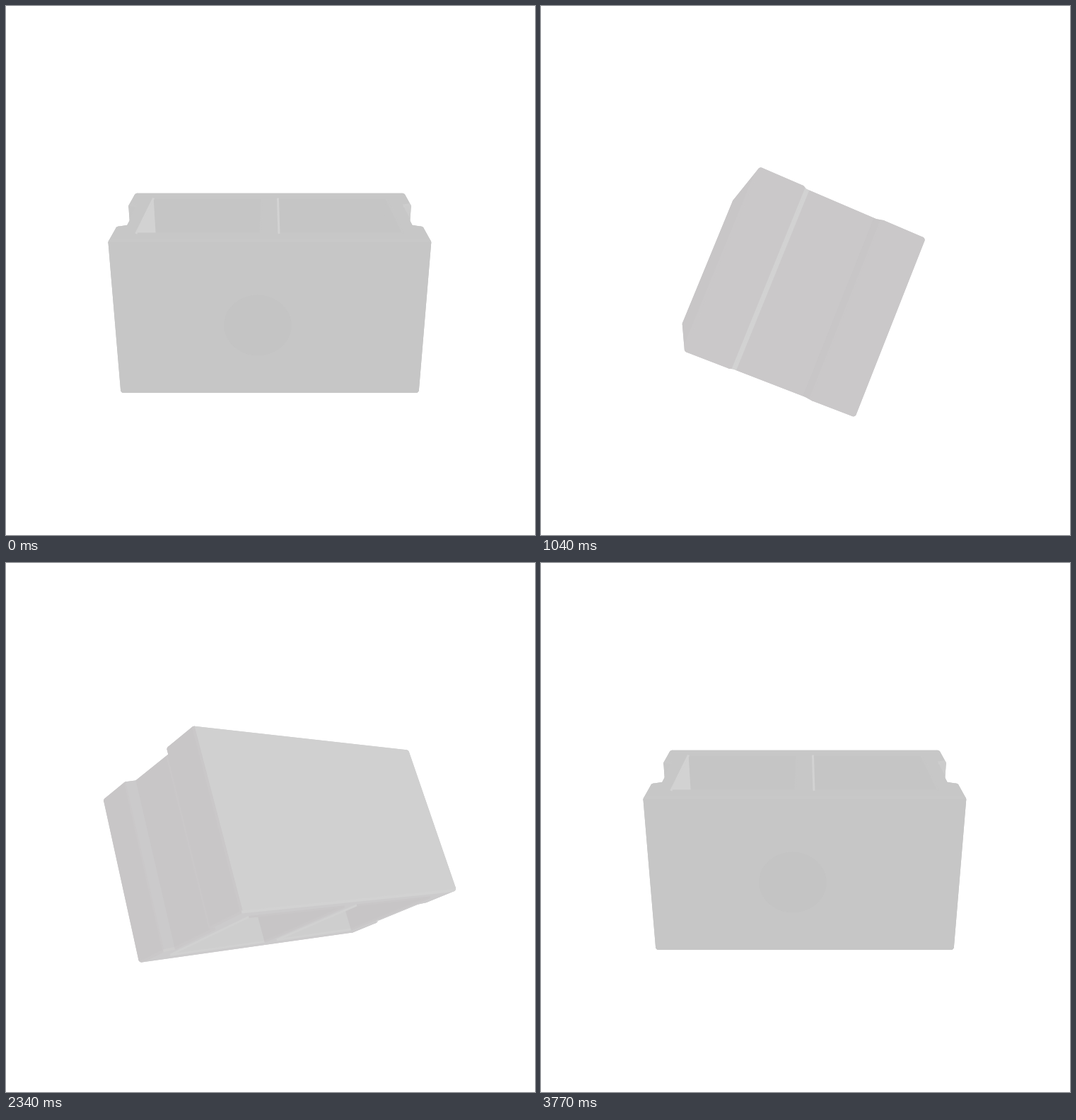
Recreate the animation shown at these times as an HTML page with a canvas. Size 748x748 px, loop 3900 ms.

```html
<!DOCTYPE html>
<html lang="en">
<head>
<meta charset="utf-8">
<title>Rotating block</title>
<style>
  html, body { margin: 0; width: 100%; height: 100%; overflow: hidden; background: #fff; }
  canvas { display: block; width: 748px; height: 748px; }
</style>
</head>
<body>
<canvas id="stage" width="748" height="748"></canvas>
<script>
const ctx = document.getElementById('stage').getContext('2d');
const SIZE = 748, MID = SIZE / 2;
const STEP = 130, STEPS = 30;

// Block half sizes, groove and hole measures, camera
const HALF = { w: 206.2, h: 112.4, d: 106.2 };
const GROOVE = { half: 47.5, depth: 13, slope: 6 };
const ROUND = 4;
const HOLES = [[-174, -12], [12, 174]];
const HOLE_Z = 80;
const TILT = 22.2 * Math.PI / 180;
const SHIFT = { x: -1, y: -26, z: -31 };
const PERSPECTIVE = 0.00093;
const sinT = Math.sin(TILT), cosT = Math.cos(TILT);

const FLOORS = [3, 9], GROOVE_SIDES = [2, 4, 8, 10], OUTER = [0, 1, 5, 6, 7, 11];
const LIPS = [2, 5, 8, 11], CORNERS = [0, 1, 6, 7];

let sinA = 0, cosA = 1;

function project([x, y, z]) {
  const px = x + SHIFT.x;
  const py = y * cosT - z * sinT + SHIFT.y;
  const pz = y * sinT + z * cosT + SHIFT.z;
  const scale = 1 / (1 - PERSPECTIVE * (pz * cosA - px * sinA));
  return [MID + (px * cosA + pz * sinA) * scale, MID - py * scale];
}

// Cross-section seen from above, pulled in by r
function outline(r) {
  const w = HALF.w - r, d = HALF.d - r, g = GROOVE.half + r;
  const f = w - GROOVE.depth, n = g - GROOVE.slope;
  return [
    [-w, d], [w, d], [w, g], [f, n], [f, -n], [w, -g],
    [w, -d], [-w, -d], [-w, -g], [-f, -n], [-f, n], [-w, g]
  ];
}

const holeOutline = ([a, b]) => [[a, HOLE_Z], [b, HOLE_Z], [b, -HOLE_Z], [a, -HOLE_Z]];
const ring = (pts, y) => pts.map(([x, z]) => project([x, y, z]));

function wall(pts, i, top, bottom) {
  const a = pts[i], b = pts[(i + 1) % pts.length];
  return [[a[0], top, a[1]], [b[0], top, b[1]], [b[0], bottom, b[1]], [a[0], bottom, a[1]]].map(project);
}

function normal(pts, i) {
  const a = pts[i], b = pts[(i + 1) % pts.length];
  const dx = b[0] - a[0], dz = b[1] - a[1], len = Math.hypot(dx, dz);
  return [-dz / len, 0, dx / len];
}

function area(p) {
  return p.reduce((sum, [x, y], i) => {
    const [u, v] = p[(i + 1) % p.length];
    return sum + x * v - u * y;
  }, 0);
}

const flip = n => n.map(v => -v);

function mean(a, b) {
  const m = a.map((v, i) => v + b[i]), len = Math.hypot(...m);
  return m.map(v => v / len);
}

// The light comes from the right
function shade([x, y, z], extra = 0) {
  const side = x * cosA + (y * sinT + z * cosT) * sinA;
  const lit = Math.max(0, Math.min(1, side / 0.65));
  const glow = 10 * lit + Math.max(0, side - 0.65) * 10 + extra;
  const tint = Math.min(1, (1 - cosA) * 4) * (1 - lit);
  return `rgb(${198 + glow + 2 * tint},${198 + glow},${198 + glow + tint})`;
}

function trace(p) {
  p.forEach(([x, y], i) => i ? ctx.lineTo(x, y) : ctx.moveTo(x, y));
  ctx.closePath();
}

function fill(p, color) {
  ctx.beginPath();
  trace(p);
  ctx.fillStyle = color;
  ctx.fill();
}

function line(a, b, color, width) {
  ctx.beginPath();
  ctx.moveTo(...a);
  ctx.lineTo(...b);
  ctx.strokeStyle = color;
  ctx.lineWidth = width;
  ctx.stroke();
}

// Rounded silhouette: smaller block with thick round outlines
function drawMask() {
  const pts = outline(ROUND), y = HALF.h - ROUND;
  const faces = pts.map((_, i) => wall(pts, i, y, -y));
  faces.push(ring(pts, y), ring(pts, -y));
  ctx.lineJoin = 'round';
  ctx.lineWidth = ROUND * 2.2;
  ctx.fillStyle = ctx.strokeStyle = shade([0, 0, 0]);
  for (const face of faces) {
    ctx.beginPath();
    trace(face);
    ctx.fill();
    ctx.stroke();
  }
}

function drawEmblem() {
  const disc = Array.from({ length: 40 }, (_, i) => {
    const a = i * Math.PI / 20;
    return project([-16 + 45 * Math.cos(a), -8 + 45 * Math.sin(a), HALF.d]);
  });
  fill(disc, shade([0, 0, 1], -2));
}

function drawWalls(pts) {
  const faces = pts.map((_, i) => wall(pts, i, HALF.h, -HALF.h));
  const seen = faces.map(f => area(f) > 0);
  for (const i of [...FLOORS, ...GROOVE_SIDES, ...OUTER]) {
    if (seen[i]) fill(faces[i], shade(normal(pts, i)));
  }
  if (seen[0]) drawEmblem();
  pts.forEach((_, i) => {
    const prev = (i + 11) % 12;
    const lip = LIPS.includes(i) && seen[OUTER.includes(i) ? i : prev];
    const corner = CORNERS.includes(i) && seen[i] && seen[prev];
    if (lip || corner) {
      const color = shade(mean(normal(pts, i), normal(pts, prev)), 2);
      line(faces[i][0], faces[i][3], color, lip ? 2.5 : 4);
    }
  });
  return seen;
}

function drawHole(span, y, up) {
  const pts = holeOutline(span), mouth = ring(pts, y);
  ctx.save();
  ctx.beginPath();
  trace(mouth);
  ctx.clip();
  pts.forEach((_, i) => {
    const face = wall(pts, i, HALF.h, -HALF.h);
    if (area(face) < 0) fill(face, shade(flip(normal(pts, i)), -1.5));
  });
  ctx.restore();
  pts.forEach((_, i) => {
    line(mouth[i], mouth[(i + 1) % 4], shade(mean(up, flip(normal(pts, i))), 1), 3);
  });
}

function drawCap(pts, y, seen) {
  const up = [0, Math.sign(y), 0], rim = ring(pts, y);
  if (area(rim) * y >= 0) return;
  fill(rim, shade(up, 1));
  seen.forEach((visible, i) => {
    if (visible) line(rim[i], rim[(i + 1) % 12], shade(mean(up, normal(pts, i)), 2), 4);
  });
  HOLES.forEach(span => drawHole(span, y, up));
}

function draw(angle) {
  sinA = Math.sin(angle);
  cosA = Math.cos(angle);
  ctx.globalCompositeOperation = 'source-over';
  ctx.clearRect(0, 0, SIZE, SIZE);
  drawMask();
  ctx.globalCompositeOperation = 'source-atop';
  const pts = outline(0);
  const seen = drawWalls(pts);
  drawCap(pts, HALF.h, seen);
  drawCap(pts, -HALF.h, seen);
}

const start = performance.now();

function tick(now) {
  const step = Math.floor(Math.max(0, now - start) / STEP) % STEPS;
  draw(step / (STEPS - 1) * Math.PI * 2);
  requestAnimationFrame(tick);
}

tick(start);
</script>
</body>
</html>
```
